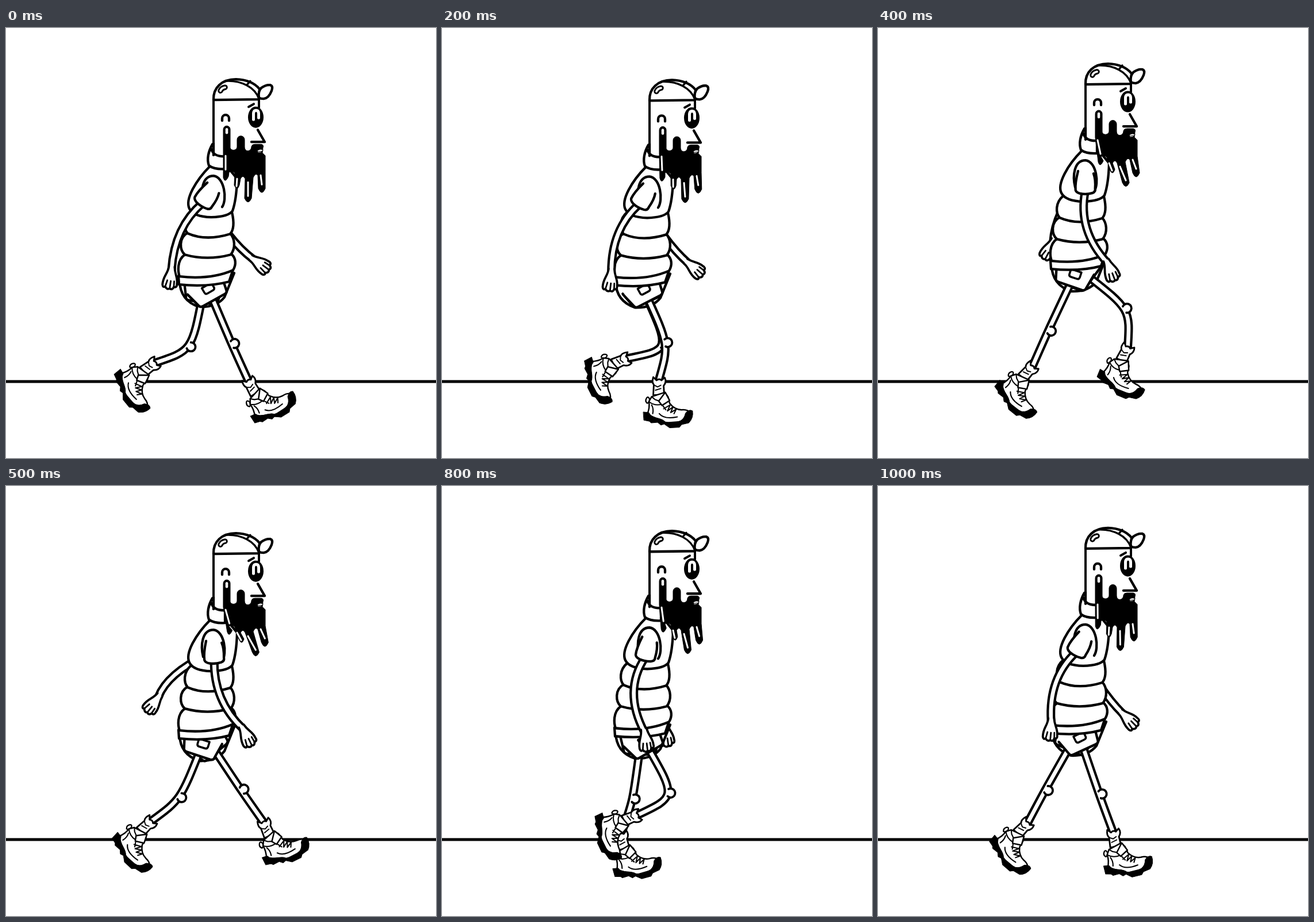
Write an HTML page with a canvas that moves like this. It is 748 px wide and 748 px high and loops after 1.1 s.

```html
<!DOCTYPE html>
<html lang="en">
<head>
<meta charset="utf-8">
<title>Walk cycle</title>
<style>
html, body { margin: 0; width: 100%; height: 100%; overflow: hidden; background: #fff; }
canvas { display: block; width: 748px; height: 748px; }
</style>
</head>
<body>
<canvas id="stage" width="748" height="748"></canvas>
<script>
const ctx = document.getElementById('stage').getContext('2d');
const STEPS = 11, STEP_MS = 100, LINE = 4.3;
const TURN = 2 * Math.PI, RAD = Math.PI / 180;
const THIGH = 111, SHIN = 66;

// One stride of a foot: step, x, y, tilt. The far foot runs half a loop apart.
const stride = [
  [0, 430, 629, -29], [0.5, 447, 621, -22], [2, 377, 630, 0], [2.5, 315, 623, -12],
  [4, 257, 602, 42], [5, 240, 595, 46], [6, 251, 590, 62], [8, 324, 579, 68],
  [9.5, 427, 571, 26], [10, 412, 619, -10], [10.5, 455, 601, -23]
];

// Arm swing: step, share of the way across
const swing = [[0, 0], [2, 0.04], [4, 0.85], [5, 1], [6, 0.95], [8, 0.43], [10, 0.08]];

// Start, pull and end of each swing: shoulder angle, elbow x y, wrist x y, hand angle
const nearArm = [[34, 304, 354, 288, 420, 4], [5, 338, 380, 372, 455, -15], [-2, 374, 375, 412, 429, -30]];
const farArm = [[0, 388, 360, 430, 402, -58], [0, 380, 385, 406, 470, 0], [0, 294, 335, 265, 374, 34]];

function track(keys, t) {
  t %= STEPS;
  const n = keys.findLastIndex(k => k[0] <= t);
  const [t0, ...a] = keys[n];
  const [t1, ...b] = keys[n + 1] || keys[0];
  const u = (t - t0) / ((t1 || STEPS) - t0);
  return a.map((v, k) => v + (b[k] - v) * u);
}

const bend = ([a, b, c], u) =>
  a.map((v, k) => (1 - u) ** 2 * v + 2 * u * (1 - u) * b[k] + u * u * c[k]);

// The body rises and falls twice per loop
function bob(i) {
  const w = 2 * TURN * i / STEPS;
  return Math.max(-27, -6.6 + 21.5 * Math.cos(w - 1.085)
    + 2.3 * Math.cos(2 * w - 3.93) + 1.7 * Math.cos(3 * w - 3.49));
}

const sway = i => 14 * (0.5 + 0.5 * Math.cos(TURN * (i - 5.6) / STEPS)) ** 1.5;

function shape(d, fill, width) {
  const path = new Path2D(d);
  if (fill) { ctx.fillStyle = fill; ctx.fill(path); }
  if (width) { ctx.lineWidth = width; ctx.strokeStyle = '#000'; ctx.stroke(path); }
}

function mark(d, width, color = '#fff') {
  ctx.lineWidth = width;
  ctx.strokeStyle = color;
  ctx.stroke(new Path2D(d));
}

function at(x, y, deg, draw) {
  ctx.save();
  ctx.translate(x, y);
  ctx.rotate(deg * RAD);
  draw();
  ctx.restore();
}

const along = (x, y, deg, len) =>
  [x - Math.sin(deg * RAD) * len, y + Math.cos(deg * RAD) * len];

function tube(d) {
  mark(d, 15, '#000');
  mark(d, 6.6);
}

function foot() {
  ctx.scale(0.95, 0.95);
  shape('M-10,-24 Q-13,-14 -9,-10 L-10,9 L10,8 L9,-8 Q15,-15 11,-23 L5,-18 Q1,-22 -4,-18 Z', '#fff', 3);
  shape('M-8,-9 L-2,-6 L4,-9 M-6,0 L4,-3', null, 2);
  shape('M-22,14 Q-26,20 -21,24 Q-16,22 -17,16 Q-19,11 -22,14Z', '#fff', 2.4);
  shape('M-21,44 Q-16,32 -18,21 L-13,12 L11,4 L17,12 L20,24 Q29,36 42,36 Q53,35 58,42 L40,58 L12,60 Z', '#fff', 2.6);
  shape('M-18,21 Q-8,29 5,26 M-13,12 L-7,17 L1,20 M-13,27 Q-9,34 -11,43 M1,43 Q10,54 34,49', null, 2.2);
  shape('M0,20 L12,4 L20,19 L6,28 Z', '#fff', 2.6);
  shape('M9,34 L21,27 L16,38 L26,31 L22,41 L32,35 L28,43 M8,29 L13,36', null, 2.2);
  shape('M-28,40 L-18,41 C-13,53 4,49 12,58 Q26,62 40,56 Q47,52 49,42 Q56,34 62,38 Q64,51 55,60 L42,63 L38,68 L20,69 L10,62 L4,64 L-2,59 L-14,60 L-17,57 L-27,55 Z', '#000', 1);
}

// Two-bone reach from hip to ankle, knee bending forwards
function findKnee(hx, hy, ax, ay) {
  const d = Math.hypot(ax - hx, ay - hy);
  const cos = (THIGH ** 2 + d * d - SHIN ** 2) / (2 * THIGH * d);
  const dir = Math.atan2(ay - hy, ax - hx) - Math.acos(Math.min(1, cos));
  const len = Math.max(THIGH, d * THIGH / (THIGH + SHIN));
  return [hx + len * Math.cos(dir), hy + len * Math.sin(dir)];
}

function leg(t, dy, pocket) {
  const [fx, fy, tilt] = track(stride, t);
  const [ax, ay] = along(fx, fy, tilt, -17);
  const px = 345, py = 444 + dy;
  const [kx, ky] = findKnee(px, py, ax, ay);
  const thigh = Math.atan2(px - kx, ky - py) / RAD - 6;
  const [hx, hy] = along(px, py, thigh, 20);
  const bx = kx + (kx - (hx + ax) / 2) / 3;
  const by = ky + (ky - (hy + ay) / 2) / 3;
  tube(`M${hx},${hy} C${bx},${by} ${bx},${by} ${ax},${ay}`);

  const out = Math.atan2(hx - ax, ay - hy);
  ctx.beginPath();
  ctx.arc(kx + 5 * Math.cos(out), ky + 5 * Math.sin(out), 7.8, out - 2.2, out + 2.2);
  ctx.fillStyle = '#fff';
  ctx.fill();
  ctx.lineWidth = 3.8;
  ctx.strokeStyle = '#000';
  ctx.stroke();

  at(fx, fy, tilt, foot);
  at(px, py, thigh, () => {
    shape('M-35,2 L-28,29 Q-27,33 -22,33 L21,34 Q26,34 27,30 L33,2', '#fff', LINE);
    if (pocket) shape('M-8,5 V14 Q-8,18 -4,18 H7 Q11,18 11,14 V5 Z', '#fff', 3.6);
  });
}

function hand() {
  shape('M-5,-5 C-6,8 -14,12 -14,27 Q-13,33 -9,30 Q-6,36 -1,33 Q4,36 6,30 Q12,31 11,24 C12,13 6,8 5,-5', '#fff', 3.8);
  shape('M-9,30 L-6,19 M-1,33 L0,20 M6,30 L6,20', null, 2.8);
}

function arm(sx, sy, [, ex, ey, wx, wy, turn]) {
  tube(`M${sx},${sy} Q${2 * ex - (sx + wx) / 2},${2 * ey - (sy + wy) / 2} ${wx},${wy}`);
  at(wx, wy, turn, hand);
}

function vest() {
  shape('M300,431 L301,446 Q350,451 388,441 L395,420', '#fff', LINE);
  shape('M311,394 C297,404 299,424 302,432 Q356,438 395,421 C401,411 400,400 392,393', '#fff', LINE);
  shape('M316,356 C300,365 302,386 311,394 Q350,405 391,394 C400,382 398,366 390,357', '#fff', LINE);
  shape('M322,319 C308,331 309,349 316,357 Q348,371 390,358 C398,349 396,333 393,320', '#fff', LINE);
  shape('M355,240 C330,265 311,298 319,314 Q326,328 357,329 Q387,328 394,318 Q401,298 402,262 L384,240', '#fff', LINE);
}

function beard(s) {
  const tip = (x, y, k) => `${x + s * k},${y}`;
  shape(`M378,176 A6,6 0 0 1 390,176 V207 C390,214 402,214 402,206 V194
    A6.5,6.5 0 0 1 415,194 V206 C415,217 427,215 427,206 Q428,202 433,202 H444
    Q449,203 447,208 L446,217 L451,222 V250 L${tip(451, 279, .4)}
    Q${tip(445, 293, .4)} ${tip(439, 279, .4)} L438,256 Q434,251 430,260
    L${tip(427, 296, 1)} Q${tip(421, 309, 1)} ${tip(415, 296, 1)}
    L416,262 Q412,254 408,262 L${tip(406, 273, .6)} Q${tip(402, 285, .6)} ${tip(397, 273, .6)}
    L398,252 Q392,246 388,251 L${tip(387, 258, .5)}
    Q${tip(381, 271, .5)} ${tip(378, 260, .5)} L378,218 Z`, '#000', 1);
  mark(`M421,268 L${tip(421, 292, 1)} M443,256 L${tip(445, 272, .4)}
    M382,222 L${tip(382, 246, .5)} M402,262 L${tip(401, 275, .6)}`, 3);
  mark('M384,176 V182', 4.5);
  shape('M437,213 Q442,209 447,212 Q446,217 438,217 Z', '#fff', 1.2);
  shape('M438,215 L446,214', null, 1);
}

function head(s) {
  shape('M361,120 V224 H440 V120 Z', '#fff');
  mark('M361,122 V222 M440,124 V138', 4, '#000');
  shape('M359,202 C352,214 349,228 353,239 Q362,246 381,245 L381,223 Q361,224 357,210', '#fff', LINE);
  mark('M361,200 V221', LINE, '#000');
  shape('M376,161 V157 A6,6 0 0 1 388,157 V161', null, LINE);
  beard(s);
  shape('M438,177 L450,198 L427,198', '#fff', LINE);
  mark('M422,137 L431,132', 4, '#000');
  shape('M421,155 A13.5,18.5 0 1 1 448,155 A13.5,18.5 0 1 1 421,155Z', '#000');
  mark('M430.5,159 V148 Q431,143 435,143 Q439,143 439.5,148 V156', 5);
  // cap
  shape('M361,125 C360,104 375,89 400,89 Q428,90 441,106 L440,124 Z', '#fff', LINE);
  shape('M383,92 C410,91 433,103 440,123 M419,99 L425,92', null, 3.4);
  shape('M440,121 Q438,111 444,104 Q452,98 460,99 Q465,101 462,109 Q457,122 448,123 Q443,123 440,121 Z', '#fff', LINE);
  mark('M373,109 Q375,104 381,103', 9.5, '#000');
  mark('M373,109 Q375,104 381,103', 3.6);
}

function render(i) {
  const dy = bob(i), [reach] = track(swing, i);
  const near = bend(nearArm, reach);
  const raised = draw => at(0, dy, 0, draw);

  ctx.fillStyle = '#fff';
  ctx.fillRect(0, 0, 748, 748);
  ctx.lineCap = ctx.lineJoin = 'round';
  mark('M-5,615 H753', 5, '#000');

  raised(() => {
    arm(350, 300, bend(farArm, reach));
    shape('M302,440 Q303,474 336,485 Q366,486 380,468 L397,426', '#fff', LINE);
  });
  leg(i + STEPS / 2, dy, false);
  leg(i, dy, true);
  raised(() => {
    vest();
    head(sway(i));
    shape('M343,304 C338,284 341,257 361,257 C380,259 385,298 376,311', '#fff', LINE);
    arm(...along(361, 276, near[0], 34), near);
    at(361, 276, near[0], () =>
      shape('M-13,0 C-16,12 -18,24 -17,33 Q-16,37 -9,39 Q2,41 12,38 Q18,36 17,30 Q18,14 14,4', '#fff', LINE));
  });
}

let shown = -1;
const start = performance.now();
function tick() {
  const i = Math.floor(Math.max(0, performance.now() - start) / STEP_MS) % STEPS;
  if (i !== shown) render(shown = i);
  requestAnimationFrame(tick);
}
tick();
</script>
</body>
</html>
```
